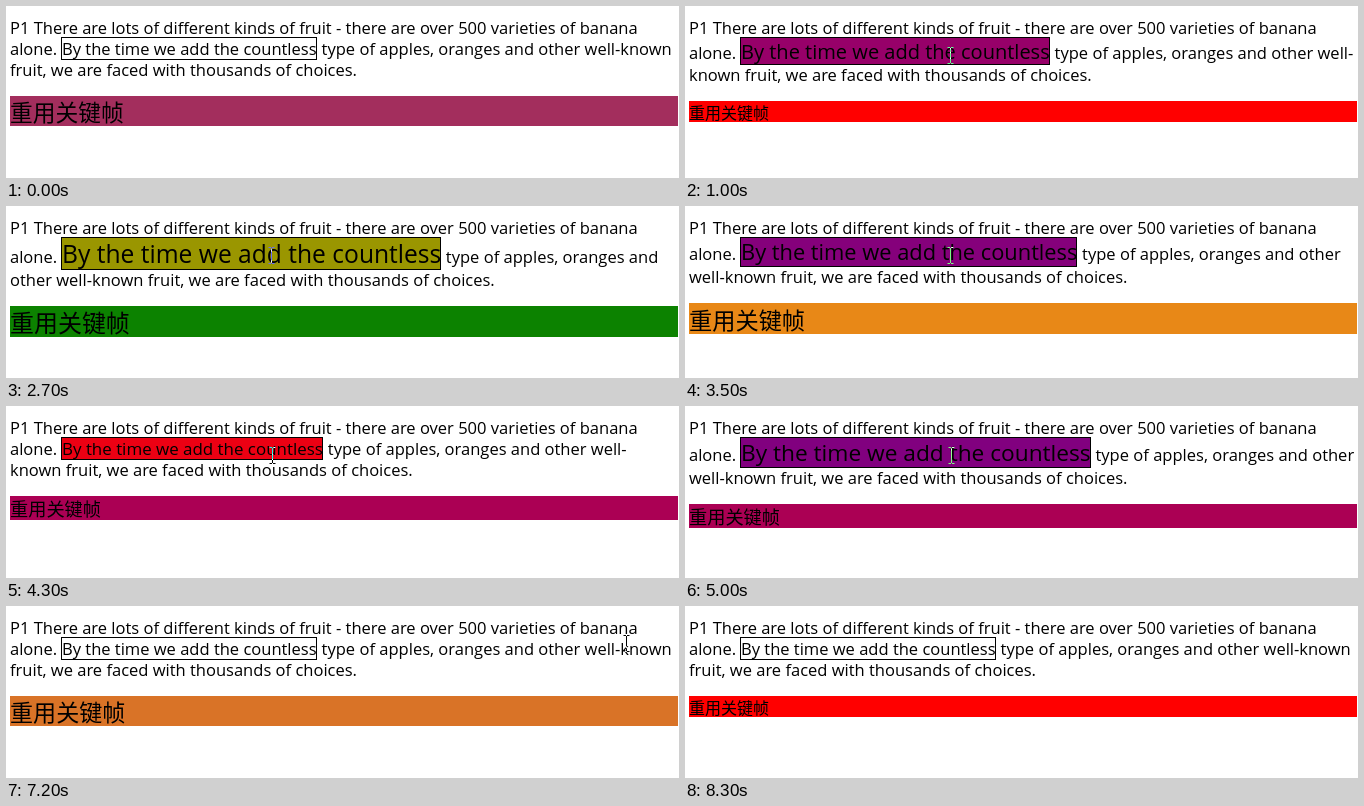
Recreate the animation shown at these times as an HTML page. Size 673 by 172 pixels, loop 8400 ms.

```html
<!DOCTYPE html>
<html lang="zh">
<head>
<meta charset="utf-8">
<title>重用关键帧</title>
<style>
  html, body { margin: 0; width: 100%; height: 100%; overflow: hidden; background: #fff; }
  svg { display: block; width: 673px; height: 172px; }
  text { font-family: "Open Sans", "Noto Sans", sans-serif; font-size: 16.53px; white-space: pre; }
  #title { font-family: "Noto Sans CJK SC", "Noto Sans CJK", sans-serif; }
  #box { stroke: #000; }
  #cursor { fill: none; stroke: #fff; mix-blend-mode: difference; }
</style>
</head>
<body>
<svg viewBox="0 0 673 172">
  <rect width="673" height="172" fill="#fff"/>
  <text x="4" y="28">P1 There are lots of different kinds of fruit - there are over 500 varieties of banana</text>
  <text id="head" x="4">alone.</text>
  <rect id="box" x="55.5" y="31.5"/>
  <text id="phrase" x="56">By the time we add the countless</text>
  <text id="tail"></text>
  <text id="last" x="4"></text>
  <rect id="bar" x="4" width="668"/>
  <text id="title" x="4">重用关键帧</text>
  <path id="cursor" d="M-3-8h2.5M.5-8h2.5M0-7.5v15M-3 8h2.5M.5 8h2.5"/>
</svg>
<script>
const LOOP = 8400, STEP = 100, HALF = 1825;
const BASE = 16, LARGE = 24;
const BAR_ZERO = 1000, HOVER_START = 530, HOVER_END = 6880;

const COLORS = [
  [0, [255, 0, 0]],
  [0.5, [128, 0, 128]],
  [0.75, [255, 165, 0]],
  [1, [0, 128, 0]]
];
// time, x, y of the pointer
const POINTER = [[540, 265, 49], [6600, 266, 49], [7200, 620, 37], [7700, 690, 37]];

const $ = id => document.getElementById(id);
const lerp = (a, b, p) => a + (b - a) * p;
const set = (id, attrs) => {
  for (const name in attrs) $(id).setAttribute(name, attrs[name]);
};

// cubic-bezier(.25, .1, .25, 1)
function ease(x) {
  const curve = (a, b, u) => 3 * a * u * (1 - u) ** 2 + 3 * b * u * u * (1 - u) + u ** 3;
  let low = 0, high = 1;
  for (let i = 0; i < 24; i++) {
    const mid = (low + high) / 2;
    if (curve(0.25, 0.25, mid) < x) low = mid; else high = mid;
  }
  return curve(0.1, 1, low);
}

// Alternating progress: 0 at `zero`, 1 after HALF, then back.
function alternate(t, zero) {
  const phase = Math.abs(t - zero) % (2 * HALF) / HALF;
  return phase > 1 ? 2 - phase : phase;
}

function segment(table, x) {
  let i = 1;
  while (i < table.length - 1 && table[i][0] < x) i++;
  const [from, to] = [table[i - 1], table[i]];
  return [from, to, (x - from[0]) / (to[0] - from[0])];
}

function color(x) {
  const [from, to, p] = segment(COLORS, x);
  return `rgb(${from[1].map((c, i) => Math.round(lerp(c, to[1][i], ease(p))))})`;
}

const fontSize = x => lerp(BASE, LARGE, ease(x));
const ascent = size => Math.round(1.0583 * size);
const lineHeight = size => ascent(size) + Math.round(0.2617 * size);

// Words that still fit on the second line beside the growing phrase.
function wrap(size) {
  const start = 'type of apples, oranges and', end = 'fruit, we are faced with thousands of choices.';
  if (size < 16.3) return [start + ' other well-known', end];
  if (size < 19.7) return [start + ' other well-', 'known ' + end];
  if (size < 22.1) return [start + ' other', 'well-known ' + end];
  return [start, 'other well-known ' + end];
}

function drawParagraph(t) {
  const hover = t >= HOVER_START && t < HOVER_END;
  const x = hover ? alternate(t, HOVER_START) : 0;
  const size = fontSize(x), height = lineHeight(size), width = size * 15.875 + 2;
  const y = 32 + ascent(size), bottom = 32 + height;
  const [tail, last] = wrap(size);
  set('head', { y });
  set('box', { width: Math.round(width) - 1, height: height + 1, fill: hover ? color(x) : 'none' });
  set('phrase', { y });
  $('phrase').style.fontSize = size * 1.033 + 'px';
  set('tail', { x: 55 + width + 4.6, y });
  $('tail').textContent = tail;
  set('last', { y: bottom + 17 });
  $('last').textContent = last;
  return bottom + 21;
}

function drawBar(t, bottom) {
  const x = alternate(t, BAR_ZERO), size = fontSize(x), y = bottom + 16;
  set('bar', { y, height: lineHeight(size), fill: color(x) });
  set('title', { y: y + ascent(size) + 0.5 });
  $('title').style.fontSize = size + 'px';
}

function drawPointer(t) {
  const visible = t >= POINTER[0][0] && t < POINTER[POINTER.length - 1][0];
  $('cursor').style.display = visible ? '' : 'none';
  if (!visible) return;
  const [from, to, p] = segment(POINTER, t);
  const x = Math.round(lerp(from[1], to[1], p)) + 0.5;
  const y = Math.round(lerp(from[2], to[2], p)) + 0.5;
  set('cursor', { transform: `translate(${x} ${y})` });
}

function draw(now) {
  const t = Math.floor(now % LOOP / STEP) * STEP;
  drawBar(t, drawParagraph(t));
  drawPointer(t);
}

const began = performance.now();
function tick() {
  draw(performance.now() - began);
  requestAnimationFrame(tick);
}
tick();
</script>
</body>
</html>
```
